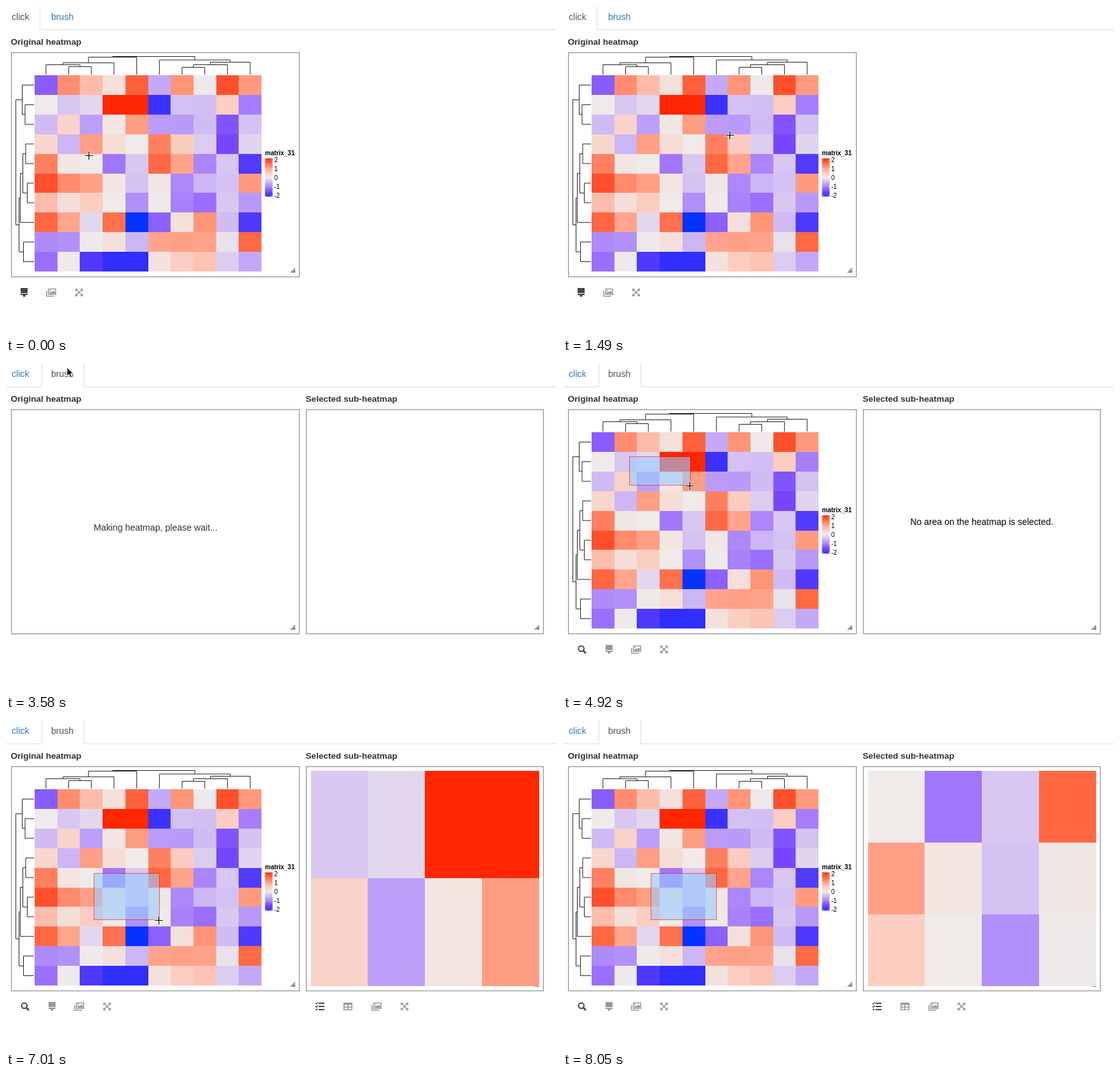
These frames come from a looping animation (867 by 518 pixels, 9400 ms). An HTML page:

```html
<!DOCTYPE html>
<html lang="en">
<head>
<meta charset="utf-8">
<title>Interactive heatmap</title>
<style>
html, body { margin: 0; width: 100%; height: 100%; overflow: hidden; background: #fff; }
svg { display: block; font: 14.15px "Liberation Sans", Arial, sans-serif; fill: #333; }
.b { font-weight: bold; font-size: 13.6px; }
.line { fill: none; stroke: #222; }
pre, .mono { font: 13px "Liberation Mono", monospace; white-space: pre; }
</style>
</head>
<body>
<svg id="stage" width="867" height="518" viewBox="0 0 867 518"></svg>
<script>
const LOOP = 9400;

// Cell values in hundredths, rows and columns in clustered order.
const values = [
  [-130, 120, 68, 20, 160, -61, 112, -2, 172, 105],
  [0, -34, -18, 200, 200, -193, -40, -42, 50, -99],
  [-45, 40, -70, 10, 102, -73, -74, -45, -138, -39],
  [35, -50, 101, 24, 2, 133, 52, -28, -151, -22],
  [133, 10, 2, -105, -33, 156, 95, -92, -35, -175],
  [172, 122, 99, 10, -39, 9, -90, -50, -40, 105],
  [67, 22, 50, 2, -84, -1, -95, -112, -33, -76],
  [156, 93, -18, 149, -250, -126, 20, 112, -45, -177],
  [-88, -83, -1, 20, -50, 95, 99, 95, -9, 155],
  [-112, -2, -177, -200, -200, 16, 50, 61, -28, -62]
];
// Colour ramp from -2.5 to 2 in steps of 0.5.
const ramp = ["#0433ff", "#302dff", "#7647ff", "#a57cfc", "#ccb6f5",
              "#efebea", "#fccdc1", "#ff9f85", "#ff704c", "#ff2600"];

function color(v) {
  const p = Math.min(8.999, v / 50 + 5), i = Math.floor(p);
  const part = (hex, k) => parseInt(hex.substr(1 + 2 * k, 2), 16);
  const mix = k => Math.round(part(ramp[i], k) + (part(ramp[i + 1], k) - part(ramp[i], k)) * (p - i));
  return `rgb(${mix(0)},${mix(1)},${mix(2)})`;
}

const text = (x, y, s, extra = "") => `<text x="${x}" y="${y}" ${extra}>${s}</text>`;
const rect = (x, y, w, h, extra = "") => `<rect x="${x}" y="${y}" width="${w}" height="${h}" ${extra}/>`;
const path = (d, extra = 'class="line"') => `<path d="${d}" ${extra}/>`;

function cells(rows, cols, x, y, w, h) {
  const cw = w / cols.length, ch = h / rows.length;
  return '<g shape-rendering="crispEdges">' + rows.map((r, i) => cols.map((c, j) =>
    rect(x + j * cw, y + i * ch, cw, ch, `fill="${color(values[r][c])}"`)).join("")).join("") + "</g>";
}

// A node is a leaf index or [height, child, child].
function tree(node, place, point) {
  const links = [];
  function walk(n) {
    if (typeof n === "number") return { at: place(n), h: null };
    const [h, a, b] = [n[0], walk(n[1]), walk(n[2])];
    links.push("M" + [point(a.at, a.h), point(a.at, h), point(b.at, h), point(b.at, b.h)].join("L"));
    return { at: (a.at + b.at) / 2, h };
  }
  walk(node);
  return path(links.join(""));
}

const ten = [...Array(10).keys()];
const colTree = [79.5, [80.5, [89.5, [92.5, 0, [95.5, 1, 2]], 3], 4],
                 [85, 5, [88.5, [92.5, [96.5, 6, 7], 8], 9]]];
const rowTree = [15.5, [25.5, 0, [30, 1, 2]],
                 [20.5, [22.5, [26.5, [31, 3, 4], [33.5, 5, 6]], 7], [27.5, 8, 9]]];

const legend =
  `<defs><linearGradient id="ramp" x1="0" y1="0" x2="0" y2="1">${ramp.slice(1).reverse()
    .map((c, i) => `<stop offset="${i / 8}" stop-color="${c}"/>`).join("")}</linearGradient></defs>` +
  text(407.5, 235, "matrix_31", 'font-size="10" font-weight="bold" fill="#000"') +
  rect(407.5, 240, 12, 60, 'fill="url(#ramp)"') +
  [2, 1, 0, -1, -2].map((v, i) => text(422, 246.2 + 14 * i, v, 'font-size="10" fill="#000"') +
    path(`M407.5 ${242.5 + 14 * i}h2.4m7.2 0h2.4`, 'stroke="#fff" stroke-width=".6"')).join("");

const heatmap = cells(ten, ten, 45, 109, 357, 309) +
  tree(colTree, i => 45 + 35.7 * (i + .5), (p, h) => [p, h ?? 108]) +
  tree(rowTree, i => 109 + 30.9 * (i + .5), (p, h) => [h ?? 44, p]) + legend;

const panel = (x, w, title) => text(x - .5, 61, title, 'class="b"') +
  rect(x + .5, 73.5, w, 353, 'fill="none" stroke="#808080"') +
  path(`M${x + w - 13} 420l7-7m-4 7l4-4m-2 4l2-2`, 'stroke="#666" stroke-width="1.2"');

const iconArt = {
  brush: '<path d="M-5-7H6V1H-5zM-5 2H6V4H2.5V6Q.5 8-1.5 6V4H-5z"/>',
  images: '<path d="M-4-5.5H7.2V3.2H-4zM-7-2.5V6H4.5" fill="none" stroke-width="1.6"/><path d="M-2.5 2V0L-.5-1.5 1-.5 4-3 6-.5V2z" stroke="none"/><circle cx="-1.3" cy="-3.2" r="1"/>',
  expand: '<path d="M-4.5-4.5L4.5 4.5M4.5-4.5L-4.5 4.5" stroke-width="1.7"/><path d="M-6-6h4.6l-4.6 4.6zM6-6v4.6l-4.6-4.6zM-6 6v-4.6l4.6 4.6zM6 6h-4.6l4.6-4.6z" stroke="none"/>',
  search: '<circle cx="-1.3" cy="-1.3" r="4.3" fill="none" stroke-width="2"/><path d="M2 2L6 6" stroke-width="2.6"/>',
  tasks: '<path d="M-2-5H7M-2 0H7M-2 5H7" stroke-width="2"/><path d="M-7-5l1.3 1.3 2.5-2.8M-7 0l1.3 1.3 2.5-2.8" fill="none" stroke-width="1.3"/><circle cx="-5.3" cy="5" r="1.4" stroke="none"/>',
  table: '<path d="M-6.2-5H6.2V5.2H-6.2zM0-4V5M-6 1H6" fill="none" stroke-width="1.6"/><path d="M-7-6H7V-2.4H-7z" stroke="none"/>'
};
const icon = (name, x, dark) => {
  const c = dark ? "#444" : "#999";
  return `<g transform="translate(${x} 451)" fill="${c}" stroke="${c}" stroke-width="0">${iconArt[name]}</g>`;
};
const icons = (names, xs) => names.map((n, i) => icon(n, xs[i], !i)).join("");

function tabs(active, hover) {
  const edge = active ? "M0 37.5H56.5V0M122.5 0V37.5H867" : "M53.5 0V37.5H867";
  const ink = on => `fill="${on ? "#555" : "#337ab7"}"`;
  return (hover ? path("M56 0H123V37H56z", 'fill="#eee"') : "") +
    path(edge, 'fill="none" stroke="#ddd"') +
    text(9, 22, "click", ink(!active)) + text(71, 22, "brush", ink(active));
}

const popBox = (x, y, h, body) => `<g transform="translate(${x} ${y})">` +
  rect(.5, .5, 369, h, 'fill="#fff" stroke="#707070"') + text(11, 28, "Output", 'class="b"') + body + "</g>";

function cellPop(x, y, row, col) {
  const v = values[row][col];
  const lines = ["heatmap: matrix_31", "row slice: 1", "column slice: 1", `row index: ${row + 1}`,
                 `column index: ${col + 1}`, `value: ${(v / 100).toFixed(2)}`, "color:"];
  return popBox(x, y, 229, text(11, 55, "Information of the clicked cell:") +
    rect(11.5, 70.5, 347, 149, 'rx="4" fill="#f5f5f5" stroke="#ccc"') +
    lines.map((s, i) => text(21, 93 + 18.57 * i, s, 'class="mono"')).join("") +
    rect(76, 194, 32, 14, `fill="${color(v)}"`));
}

const areaPop = (x, y, rows) => popBox(x, y, 158,
  [`Selected over 1 heatmap with ${rows} rows and 4 columns.`,
   "Row and column indices can be obtained by copying", "following code:"]
    .map((s, i) => text(11, 55 + 20 * i, s)).join("") +
  rect(11.5, 110.5, 125, 33, 'rx="4" fill="#fff" stroke="#ccc"') + text(24, 132, "show/hide code"));

const cursorArt = {
  cross: path("M-7 .5H8M.5-7V8", 'stroke="#fff" stroke-width="3" opacity=".7"') +
    path("M-6 .5H7M.5-6V7", 'stroke="#000" stroke-width="1.2"'),
  arrow: path("M0 0V13.5L3.1 10.6 5.4 16 7.8 15 5.5 9.8H9.8z", 'fill="#000" stroke="#fff"'),
  resize: path("M0-9L4.2-4H1.2V4H4.2L0 9-4.2 4H-1.2V-4H-4.2z", 'fill="#000" stroke="#fff"')
};

// Each step changes part of the state and holds until the next.
const steps = [
  [0, { tab: 0, ready: true, cur: "cross", at: [130, 235] }],
  [150, { at: [127, 270] }],
  [750, { pop: cellPop(128, 271, 5, 2), cur: "arrow", at: [125, 268] }],
  [1490, { pop: "", cur: "cross", at: [262, 203] }],
  [1640, { at: [271, 197] }],
  [1930, { pop: cellPop(272, 198, 2, 6) }],
  [2080, { cur: "arrow", at: [270, 196] }],
  [2830, { pop: "", cur: "cross", at: [252, 176] }],
  [2980, { at: [192, 104] }],
  [3130, { cur: "arrow", at: [124, 44] }],
  [3280, { hover: true, at: [96, 8] }],
  [3580, { hover: false, tab: 1, ready: false, at: [96, 7] }],
  [3880, { ready: true, at: [96, 8] }],
  [4030, { at: [98, 52] }],
  [4180, { cur: "cross", at: [104, 122] }],
  [4320, { at: [104, 148] }],
  [4620, { at: [121, 158], brush: [104, 147, 122, 157] }],
  [4770, { at: [167, 181], brush: [104, 147, 168, 180] }],
  [4920, { at: [199, 193], brush: [104, 147, 200, 192] }],
  [5370, { pop: areaPop(200, 192, 2), side: true }],
  [5520, { sub: [[1, 2], [1, 2, 3, 4]] }],
  [5820, { cur: "resize", at: [195, 198] }],
  [5970, { pop: "", cur: "cross", at: [150, 230] }],
  [6120, { at: [137, 240] }],
  [6420, { at: [161, 257], brush: [138, 241, 162, 256] }],
  [6570, { at: [216, 298], brush: [138, 241, 217, 297] }],
  [6710, { at: [240, 315], brush: [138, 241, 241, 314] }],
  [7160, { pop: areaPop(241, 315, 3) }],
  [7310, { sub: [[4, 5, 6], [2, 3, 4, 5]] }],
  [7910, { pop: "", cur: "resize", at: [243, 323] }],
  [8050, { cur: "" }]
];

function scene(s) {
  let out = tabs(s.tab, s.hover) + panel(8, 453, "Original heatmap");
  out += s.ready ? heatmap : text(138, 264, "Making heatmap, please wait...");
  if (!s.tab) out += icons(["brush", "images", "expand"], [28, 71, 115]);
  else {
    out += panel(472, 373, "Selected sub-heatmap");
    if (s.ready) out += icons(["search", "brush", "images", "expand"], [30, 72, 115, 159]);
    if (s.side) out += icons(["tasks", "table", "images", "expand"], [494, 538, 583, 627]);
    if (s.sub) out += cells(...s.sub, 479.5, 79.5, 359, 339);
    else if (s.ready) out += text(546.5, 255, "No area on the heatmap is selected.", 'font-size="14" fill="#000"');
  }
  if (s.brush) {
    const [x0, y0, x1, y1] = s.brush;
    out += rect(x0 + .5, y0 + .5, x1 - x0, y1 - y0, 'fill="#9cf" stroke="red" opacity=".6"');
  }
  out += s.pop || "";
  if (s.cur) out += `<g transform="translate(${s.at})">${cursorArt[s.cur]}</g>`;
  return out;
}

const stage = document.getElementById("stage");
let shown = 0;
function tick() {
  const t = performance.now() % LOOP;
  const past = steps.filter(([start]) => start <= t);
  if (past.length !== shown) {
    shown = past.length;
    stage.innerHTML = scene(Object.assign({}, ...past.map(p => p[1])));
  }
  requestAnimationFrame(tick);
}
tick();
</script>
</body>
</html>
```
